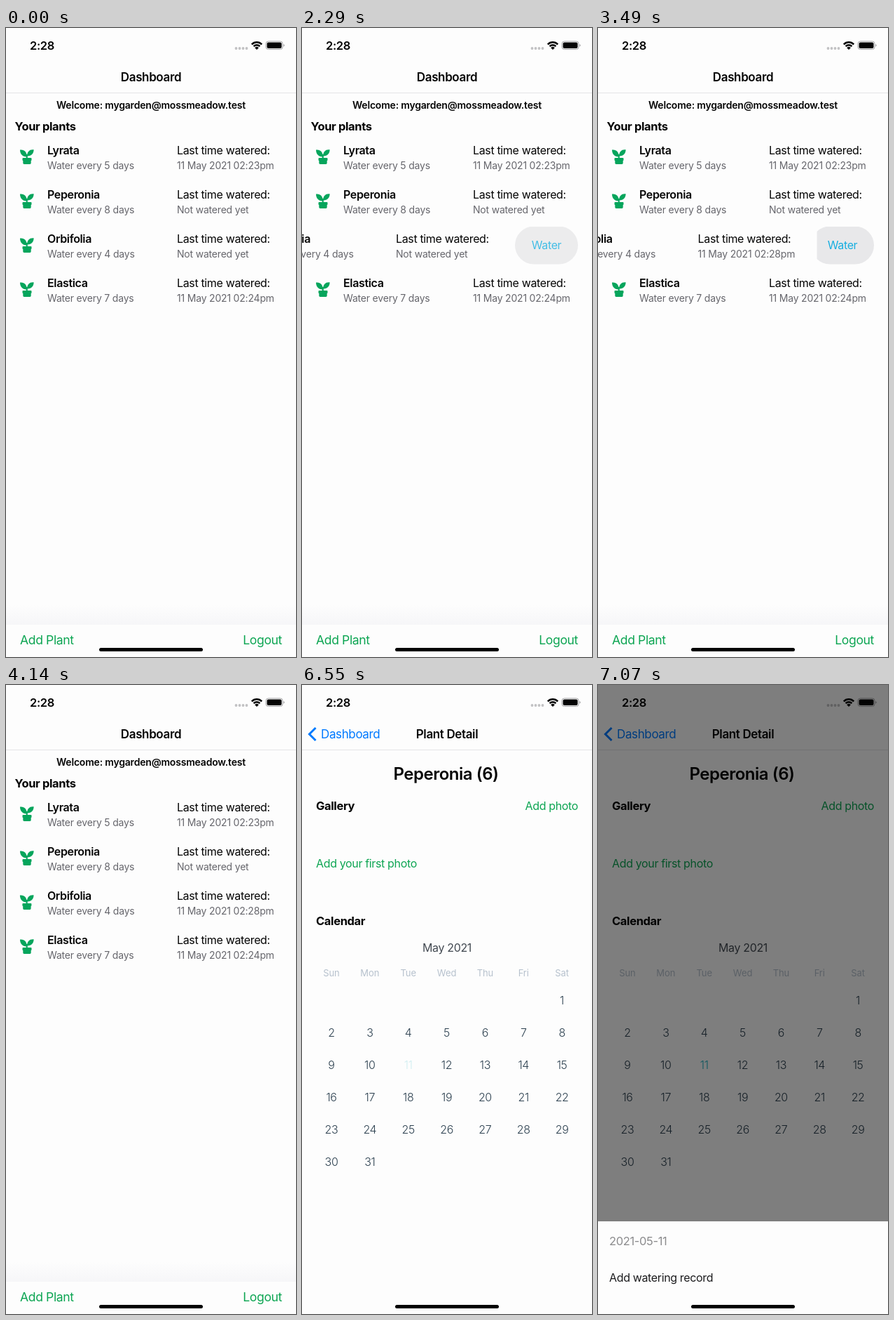
Animation, 414 px wide and 896 px high, one loop 7.99 s. Source, as an HTML page:

```html
<!DOCTYPE html>
<html lang="en">
<head>
<meta charset="utf-8">
<title>Plant watering</title>
<style>
html, body { margin: 0; width: 100%; height: 100%; overflow: hidden; background: #fdfdfd; }
svg { display: block; width: 100%; height: 100%; font-family: Inter, Roboto, sans-serif; }
</style>
</head>
<body>
<svg id="stage" viewBox="0 0 414 896" xmlns="http://www.w3.org/2000/svg"></svg>
<script>
const LOOP = 7990;
const BG = '#fdfdfd', GREEN = '#0ca552', BLUE = '#007aff', BLACK = '#040404', GRAY = '#66666c';
const OPEN = -110;
const stage = document.getElementById('stage');

// Tracking in em, tighter for larger type
const tracking = size => size <= 13 ? -0.006 : size <= 14 ? -0.014 : size <= 18 ? -0.022 : -0.02;

function text(str, x, y, size, { weight = 400, fill = BLACK, anchor = 'start', id = '' } = {}) {
  return `<text ${id && `id="${id}"`} x="${x}" y="${y}" font-size="${size}" font-weight="${weight}"
    fill="${fill}" text-anchor="${anchor}" letter-spacing="${tracking(size)}em">${str}</text>`;
}
const rect = (x, y, w, h, fill, extra = '') =>
  `<rect x="${x}" y="${y}" width="${w}" height="${h}" fill="${fill}" ${extra}/>`;
const heading = (str, x, y) => text(str, x, y, 16.5, { weight: 700 });
const navTitle = str => text(str, 207, 76, 17, { weight: 600, anchor: 'middle' });
const hairline = rect(0, 92, 414, 1, '#e4e4e6');

const plantIcon = `<g transform="translate(20 173)" fill="#06a55c">
  <path d="M0 .6C6 -.2 9.800 3.500 9.800 10.500C3.500 10.800 0 6.500 0 .6Z"/>
  <path d="M19.600 .2C13.500 -.4 10.200 3 10 9.500C16 9.800 19.800 5.500 19.600 .2Z"/>
  <path d="M8.800 7h2v6h-2Z"/>
  <path d="M4.500 12h11q1 0 1 1v2q0 .8-.8 1v3.300q0 1.700-1.500 1.700h-8.400q-1.500 0-1.500-1.700v-3.300q-.8-.2-.8-1v-2q0-1 1-1Z"/>
</g>`;

function plantRow([name, days, watered], i) {
  return `<g transform="translate(0 ${i * 63})"><g id="row${i}">
    ${rect(-20, 158, 434, 62, BG)}${plantIcon}
    ${text(name, 59, 180, 16, { weight: 600 })}
    ${text(`Water every ${days} days`, 59, 201, 14, { fill: GRAY })}
    ${text('Last time watered:', 244, 180, 16)}
    ${text(watered, 244, 201, 14, { fill: GRAY, id: 'watered' + i })}
  </g></g>`;
}

const plants = [
  ['Lyrata', 5, '11 May 2021 02:23pm'],
  ['Peperonia', 8, 'Not watered yet'],
  ['Orbifolia', 4, 'Not watered yet'],
  ['Elastica', 7, '11 May 2021 02:24pm']
];

const dashboard = `<g>
  ${navTitle('Dashboard')}${hairline}
  ${text('Welcome: mygarden@mossmeadow.test', 207, 115, 14, { weight: 600, anchor: 'middle' })}
  ${heading('Your plants', 12.500, 146)}
  <g id="button">
    ${rect(304, 282.500, 90, 54, '#e8e8ea', 'rx="27"')}
    ${text('Water', 349, 315, 16, { fill: '#16aee0', anchor: 'middle' })}
  </g>
  ${plants.map(plantRow).join('')}
  ${rect(0, 822, 414, 28, 'url(#fade)')}
  ${text('Add Plant', 20, 878, 17.600, { fill: GREEN })}
  ${text('Logout', 394, 878, 17.600, { fill: GREEN, anchor: 'end' })}
</g>`;

const column = c => 42 + c * 54.850;

function calendar() {
  let out = text('May 2021', 207, 380, 16, { fill: '#434a52', anchor: 'middle' });
  ['Sun', 'Mon', 'Tue', 'Wed', 'Thu', 'Fri', 'Sat'].forEach((day, c) => {
    out += text(day, column(c), 415, 13, { fill: '#b6c1cd', anchor: 'middle' });
  });
  for (let d = 1; d <= 31; d++) {
    const cell = d + 5, today = d === 11;
    out += text(d, column(cell % 7), 454.500 + 46 * Math.floor(cell / 7), 16, {
      weight: 300, anchor: 'middle',
      fill: today ? '#20b2c0' : '#2d4150', id: today ? 'today' : ''
    });
  }
  return out;
}

const detail = `<g id="detail">
  ${rect(0, 0, 414, 900, BG)}${hairline}
  <path d="M19.500 61L10.500 70L19.500 79" fill="none" stroke="${BLUE}" stroke-width="3"/>
  ${text('Dashboard', 27, 76, 17, { fill: BLUE })}
  ${navTitle('Plant Detail')}
  ${text('Peperonia (6)', 205.500, 134.500, 24, { weight: 600, anchor: 'middle' })}
  ${heading('Gallery', 20, 178)}
  ${text('Add photo', 394, 178, 16, { fill: GREEN, anchor: 'end' })}
  ${text('Add your first photo', 20, 260, 16, { fill: GREEN })}
  ${heading('Calendar', 20, 342)}
  ${calendar()}
</g>`;

const dots = [328.500, 333.500, 338.500, 343.500]
  .map(x => `<circle cx="${x}" cy="29" r="1.900" fill="#c2c2c4"/>`).join('');
const statusBar = `<g>
  ${text('2:28', 34, 31, 16.500, { weight: 600 })}${dots}
  <g fill="none" stroke="${BLACK}" stroke-width="2.500">
    <path d="M350.800 23.300A10 10 0 0 1 365.200 23.300"/>
    <path d="M353.600 26.200A6 6 0 0 1 362.400 26.200"/>
  </g>
  <path d="M358 31L355.200 28.200A4 4 0 0 1 360.800 28.200Z" fill="${BLACK}"/>
  <rect x="371" y="19" width="24" height="11.500" rx="3.500" fill="none" stroke="#a4a4a6"/>
  ${rect(372.500, 20.500, 21, 8.500, BLACK, 'rx="2"')}
  <path d="M396.300 23q1.500 .6 1.500 1.800t-1.500 1.800Z" fill="#a4a4a6"/>
</g>`;

const sheet = `<g id="sheet">
  ${rect(0, 764, 414, 140, BG)}
  ${text('2021-05-11', 16, 797.500, 16.500, { fill: '#8c8c8e' })}
  ${text('Add watering record', 16, 850, 16, { fill: '#1c1c1e' })}
</g>`;

stage.innerHTML = `<defs><linearGradient id="fade" x2="0" y2="1">
    <stop offset="0" stop-color="${BG}"/><stop offset="1" stop-color="#f6f6f8"/>
  </linearGradient></defs>
  ${rect(0, 0, 414, 896, BG)}${dashboard}${detail}${statusBar}
  ${rect(0, 0, 414, 896, '#000', 'id="dim"')}
  ${sheet}${rect(133, 883, 148, 5, '#000', 'rx="2.500"')}`;

const $ = id => document.getElementById(id);
const button = $('button'), row = $('row2'), watered = $('watered2');
const detailCard = $('detail'), today = $('today'), dim = $('dim'), sheetCard = $('sheet');

const span = (t, a, b) => Math.min(1, Math.max(0, (t - a) / (b - a)));
const mix = (a, b, p) => a + (b - a) * p;
const inOut = p => p < 0.5 ? 2 * p * p : 1 - 2 * (1 - p) ** 2;
const move = (el, x, y) => el.setAttribute('transform', `translate(${x.toFixed(2)} ${y.toFixed(2)})`);

// Remaining distance of a spring, 1 at rest start, 0 when settled
function bouncy(ms) {
  const t = Math.max(0, ms) / 1000, w = 10.450;
  return Math.exp(-11 * t) * (Math.cos(w * t) + 11 / w * Math.sin(w * t));
}
function critical(ms) {
  const u = 18.260 * Math.max(0, ms) / 1000;
  return (1 + u) * Math.exp(-u);
}

function rowOffset(t) {
  if (t < 890) return -70 * span(t, 665, 890) ** 1.500;
  if (t < 3462) return OPEN + 40 * bouncy(t - 890);
  return OPEN * bouncy(t - 3462);
}

function tapOpacity(t) {
  return t < 2130 ? mix(1, 0.2, inOut(span(t, 1800, 1950))) : mix(0.2, 1, inOut(span(t, 2130, 2380)));
}

function draw(t) {
  move(row, rowOffset(t), 0);
  button.setAttribute('opacity', tapOpacity(t));
  button.setAttribute('visibility', t > 665 && t < 4140 ? 'visible' : 'hidden');
  watered.textContent = t < 2610 ? 'Not watered yet' : '11 May 2021 02:28pm';

  move(detailCard, 0, t < 5580 ? 896 * critical(t - 4957) : 0);
  detailCard.setAttribute('visibility', t < 4940 ? 'hidden' : 'visible');
  today.setAttribute('opacity', t < 6550 ? 1 : mix(0.2, 1, inOut(span(t, 6630, 6880))));

  dim.setAttribute('opacity', 0.5 * inOut(span(t, 6750, 7050)));
  move(sheetCard, 0, 132 * (1 - span(t, 6883, 7070)) ** 2);
}

const start = performance.now();
function tick() {
  draw((performance.now() - start) % LOOP);
  requestAnimationFrame(tick);
}
tick();
</script>
</body>
</html>
```
